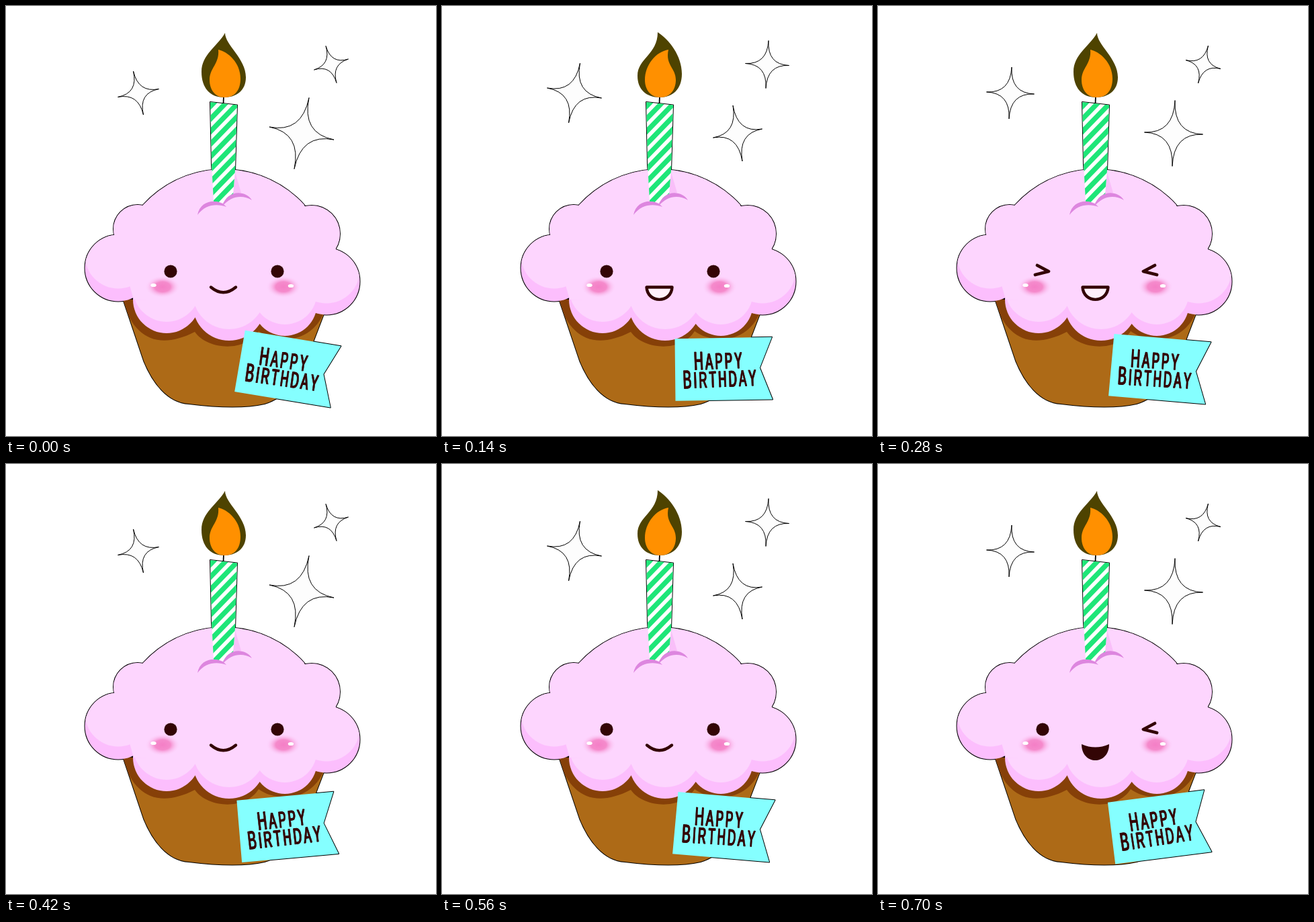
These frames come from a looping animation (640x640 px, 0.84 s). An HTML page with a canvas:

```html
<!DOCTYPE html>
<html lang="en">
<head>
<meta charset="utf-8">
<title>Birthday cupcake</title>
<style>
  html, body { margin: 0; width: 100%; height: 100%; overflow: hidden; background: #fff; }
  canvas { display: block; width: 640px; height: 640px; }
</style>
</head>
<body>
<canvas id="stage" width="640" height="640"></canvas>
<script>
const ctx = document.getElementById('stage').getContext('2d');
const STEP = 140;
const INK = '#330505';
const TAU = Math.PI * 2;

// One entry per step of the loop; star and flame poses repeat every three.
const steps = [
  { tilt: 9.7, mouth: 'smile', eyes: 'oo' },
  { tilt: -0.6, mouth: 'laugh', eyes: 'oo' },
  { tilt: 5.2, mouth: 'laugh', eyes: '><' },
  { tilt: -4.8, mouth: 'smile', eyes: 'oo' },
  { tilt: 5.2, mouth: 'smile', eyes: 'oo' },
  { tilt: -7, mouth: 'open', eyes: 'o<' }
];

// Each pose: upward arm x, y and rightward arm x, y.
const stars = [
  { x: 197, y: 129.5, poses: [[-7.5, -32.5, 30.5, -6], [8.5, -44.5, 40.5, 7.5], [2, -38.5, 35.5, 1.5]] },
  { x: 484, y: 87, poses: [[-8, -27.5, 25.5, -8], [2, -35.5, 32.5, 1.5], [7.5, -28, 26, 6.5]] },
  { x: 440, y: 189.5, poses: [[11, -53, 48, 9.5], [-7, -41.5, 36.5, -6.5], [2, -49, 43.5, 1.5]] }
];

const flames = [
  {
    outer: new Path2D('M326 40 C326 58 357 78 357 106 C357 126 343 136 324 136 C304 136 291 122 291 98 C291 72 315 60 326 40Z'),
    inner: new Path2D('M316 65 C330 68 349 84 349 108 C349 126 340 136 325 136 C311 136 303 124 303 110 C303 92 318 86 316 65Z')
  },
  {
    outer: new Path2D('M321 39 C338 50 357 74 357 101 C357 124 343 136 324 136 C304 136 291 124 291 104 C291 78 321 72 321 39Z'),
    inner: new Path2D('M337 65 C318 68 302 88 302 110 C302 126 312 136 325 136 C340 136 348 124 348 110 C348 92 332 88 337 65Z')
  }
];

const cup = new Path2D('M174 436 L205 528 C218 560 240 590 272 592 Q345 601 385 592 C425 580 440 540 448 524 L474 456Z');
const cupShade = new Path2D('M171 430 C186 490 222 515 281 485 C300 512 356 516 376 484 C400 502 455 505 474 454 L474 430Z');
const candle = new Path2D('M304 143 L344 147.5 L341 245 L338 281 L323 293 L309 291 L306 235Z');
const swirl = new Path2D('M285 311 C289 287 318 286 328 299 C314 294 297 295 285 311Z M322 298 C328 274 356 273 366 289 C352 281 336 282 322 298Z');
const flag = new Path2D('M-73 -46 L71.5 -47 L53 -1.5 L71.5 45.7 L-73 46.5Z');

const frosting = makeFrosting([0, 0, 0, 0, 0]);
const frostingLight = makeFrosting([19, 17, 17, 17, 17]);

// Lobes along the lower edge are raised by the given amounts.
function makeFrosting(lift) {
  const path = new Path2D('M163 341 L204 297 L324 255 L444 297 L491 361 L460 440 L190 437Z');
  path.moveTo(204, 297);
  path.arc(324, 405, 162, Math.PI + 0.733, TAU - 0.733);
  path.lineTo(324, 330);
  path.closePath();
  const addCircle = (x, y, r) => {
    path.moveTo(x + r, y);
    path.arc(x, y, r, 0, TAU);
  };
  addCircle(196, 332, 36);
  addCircle(455, 339, 42);
  const lobes = [[167, 390, 49.5], [239, 437, 50], [332, 444, 54], [415, 443, 48], [477, 410, 49.5]];
  lobes.forEach(([x, y, r], i) => addCircle(x, y - lift[i], r));
  return path;
}

function fill(path, color) {
  ctx.fillStyle = color;
  ctx.fill(path);
}

function outline(path) {
  ctx.strokeStyle = '#000';
  ctx.lineWidth = 2;
  ctx.stroke(path);
}

function clipped(path, draw) {
  ctx.save();
  ctx.clip(path);
  draw();
  ctx.restore();
}

function line(...points) {
  ctx.beginPath();
  points.forEach(([x, y]) => ctx.lineTo(x, y));
  ctx.stroke();
}

function ellipse(x, y, rx, ry, color) {
  ctx.fillStyle = color;
  ctx.beginPath();
  ctx.ellipse(x, y, rx, ry, 0, 0, TAU);
  ctx.fill();
}

function onFlag(tilt, draw) {
  ctx.save();
  ctx.translate(420, 540.5);
  ctx.rotate(tilt * Math.PI / 180);
  draw();
  ctx.restore();
}

function drawStar({ x, y, poses }, pose) {
  const [ux, uy, rx, ry] = poses[pose];
  const tips = [[rx, ry], [-ux, -uy], [-rx, -ry], [ux, uy]];
  ctx.beginPath();
  ctx.moveTo(x + ux, y + uy);
  tips.forEach(([dx, dy]) => ctx.quadraticCurveTo(x, y, x + dx, y + dy));
  ctx.closePath();
  ctx.fillStyle = '#fdfdfd';
  ctx.fill();
  ctx.strokeStyle = '#000';
  ctx.lineWidth = 1;
  ctx.stroke();
}

function drawCandle() {
  fill(candle, '#fff');
  clipped(candle, () => {
    ctx.strokeStyle = '#1ee678';
    ctx.lineWidth = 7.4;
    for (let y = 150; y < 350; y += 18.75) line([294, y + 10], [354, y - 52]);
  });
}

function drawCake() {
  fill(cup, '#ad6a17');
  clipped(cup, () => fill(cupShade, '#864008'));
  fill(frosting, '#fcbefd');
  clipped(frosting, () => fill(frostingLight, '#fdd5fe'));
  fill(new Path2D('M341 247 L350 278 L336 282Z'), '#f9bff9');
  drawCandle();
  fill(swirl, '#dd86df');
}

function drawFlame({ outer, inner }) {
  ctx.strokeStyle = '#000';
  ctx.lineWidth = 1.8;
  line([324, 134], [323.5, 145]);
  fill(outer, '#4e4300');
  fill(inner, '#ff9000');
}

function drawCheek(x, shineX, shineY) {
  ctx.save();
  ctx.translate(x, 418);
  ctx.scale(1, 0.64);
  const glow = ctx.createRadialGradient(0, 0, 0, 0, 0, 26);
  glow.addColorStop(0, '#f47fc6');
  glow.addColorStop(0.45, '#f58bcc');
  glow.addColorStop(1, 'rgba(253,213,254,0)');
  ellipse(0, 0, 26, 26, glow);
  ctx.restore();
  ellipse(shineX, shineY, 4.2, 2.6, '#fff');
}

function drawEye(kind, x) {
  if (kind === 'o') return ellipse(x, 395, 9.6, 9.6, INK);
  const dir = kind === '<' ? 1 : -1;
  ctx.lineWidth = 4.8;
  line([x + dir * 8, 386], [x - dir * 9, 395], [x + dir * 11, 400]);
}

function drawMouth(kind) {
  const shapes = {
    smile: 'M305 418.500 Q323.500 434 342 418.500',
    laugh: 'M304.500 418.500 H342.500 C341 443 306 443 304.500 418.500Z',
    open: 'M303 417 Q323.500 426 344 417 C344 449 303 449 303 417Z'
  };
  const path = new Path2D(shapes[kind]);
  if (kind === 'open') return fill(path, INK);
  if (kind === 'laugh') fill(path, '#fff0fa');
  ctx.lineWidth = 4.4;
  ctx.stroke(path);
}

function drawFace({ eyes, mouth }) {
  drawCheek(233, 219.5, 415.5);
  drawCheek(413, 424, 416.5);
  ctx.strokeStyle = INK;
  ctx.lineCap = 'round';
  drawEye(eyes[0], 245);
  drawEye(eyes[1], 404);
  drawMouth(mouth);
  ctx.lineCap = 'butt';
}

// Narrow, loosely spaced lettering with a tall first letter.
function drawWord(word, x, y) {
  ctx.save();
  ctx.translate(x, y);
  ctx.scale(0.5, 1);
  ctx.fontKerning = 'none';
  ctx.letterSpacing = '6.5px';
  ctx.lineWidth = 1;
  let pen = 0;
  [[word[0], 38], [word.slice(1), 33.5]].forEach(([text, size]) => {
    ctx.font = `${size}px "Liberation Sans", Arial, sans-serif`;
    for (const dx of [-0.9, 0.9]) {
      ctx.fillText(text, pen + dx, 0);
      ctx.strokeText(text, pen + dx, 0);
    }
    pen += ctx.measureText(text).width;
  });
  ctx.restore();
}

function drawFlag() {
  fill(flag, '#85ffff');
  ctx.rotate(-0.03);
  ctx.fillStyle = ctx.strokeStyle = INK;
  drawWord('HAPPY', -44.5, -0.7);
  drawWord('BIRTHDAY', -62, 26.2);
}

function render(index) {
  const step = steps[index];
  const pose = index % 3;

  ctx.fillStyle = '#fff';
  ctx.fillRect(0, 0, 640, 640);
  ctx.lineJoin = 'round';
  stars.forEach(star => drawStar(star, pose));

  // Outlines go underneath, so they show only against the background.
  [cup, frosting, candle].forEach(outline);
  onFlag(step.tilt, () => outline(flag));

  drawFlame(flames[pose === 1 ? 1 : 0]);
  drawCake();
  drawFace(step);
  onFlag(step.tilt, drawFlag);
}

let start = null;
function tick(now) {
  if (start === null) start = now;
  render(Math.floor((now - start) / STEP) % steps.length);
  requestAnimationFrame(tick);
}
render(0);
requestAnimationFrame(tick);
</script>
</body>
</html>
```
